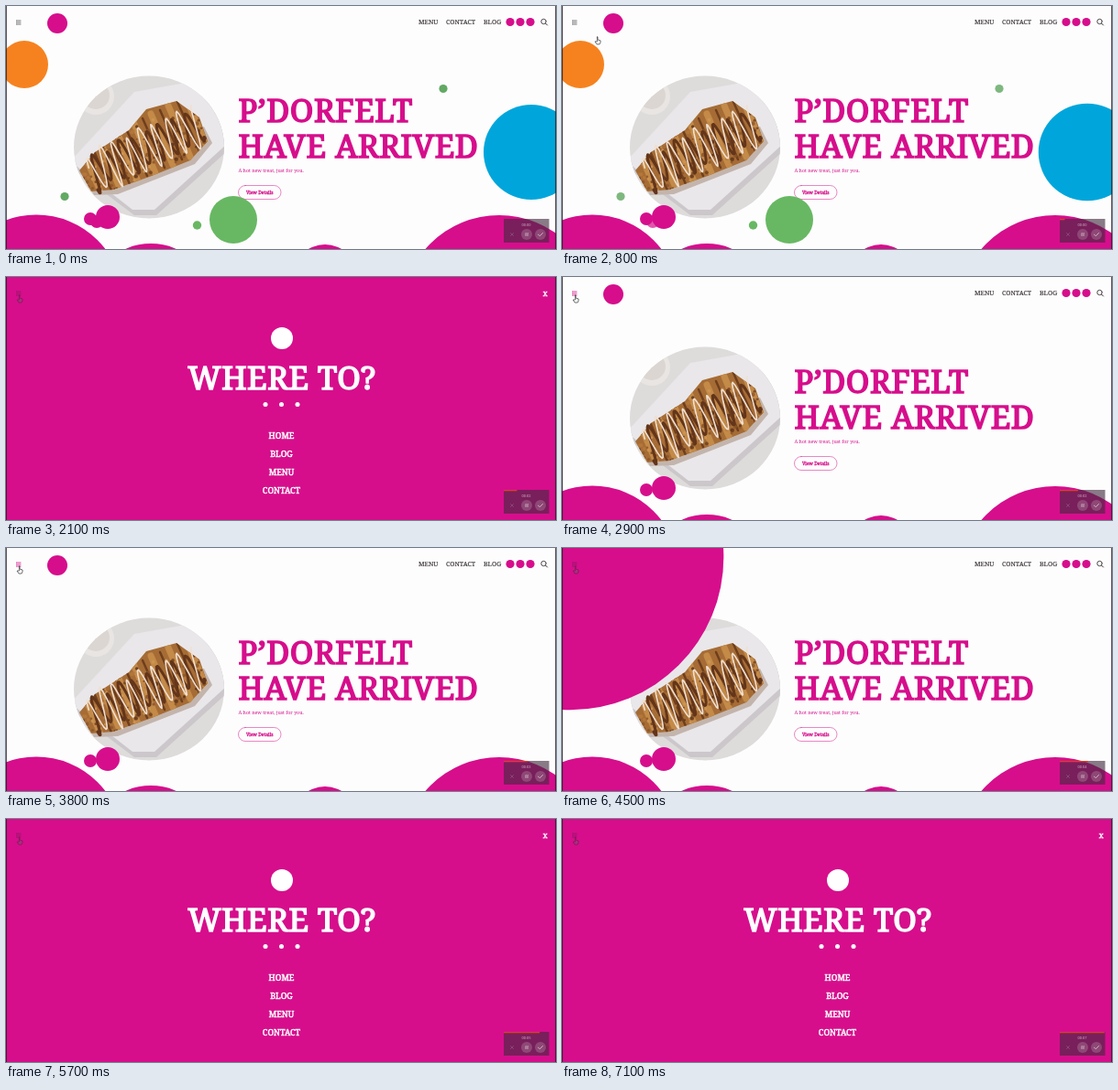
Animation, 600 px wide and 266 px high, one loop 7200 ms. Source, as an HTML page with a canvas:

```html
<!DOCTYPE html>
<html lang="en">
<head>
<meta charset="utf-8">
<style>
html, body { margin: 0; width: 100%; height: 100%; overflow: hidden; background: #fdfdfd; }
canvas { display: block; width: 600px; height: 266px; }
</style>
</head>
<body>
<canvas id="stage"></canvas>
<script>
const LOOP = 7200, STEP = 100;
const PINK = '#d60e8c', GREEN = '#68b863', DARK = '#3a3438', WHITE = '#fff';
const canvas = document.getElementById('stage');
const ctx = canvas.getContext('2d');
const dpr = window.devicePixelRatio || 1;
canvas.width = 600 * dpr;
canvas.height = 266 * dpr;

const clamp = v => Math.max(0, Math.min(1, v));
const smooth = v => { v = clamp(v); return v * v * (3 - 2 * v); };
const random = seed => { const v = Math.sin(seed * 12.9898) * 43758.5453; return v - Math.floor(v); };

function disc(x, y, r, color, alpha = 1) {
  ctx.globalAlpha = alpha;
  ctx.fillStyle = color;
  ctx.beginPath();
  ctx.arc(x, y, r, 0, 7);
  ctx.fill();
  ctx.globalAlpha = 1;
}

function path(points, { fill, stroke, width = 1, close = false }) {
  ctx.beginPath();
  points.forEach(([x, y]) => ctx.lineTo(x, y));
  if (close) ctx.closePath();
  ctx.lineWidth = width;
  ctx.lineCap = ctx.lineJoin = 'round';
  if (fill) { ctx.fillStyle = fill; ctx.fill(); }
  if (stroke) { ctx.strokeStyle = stroke; ctx.stroke(); }
}

function text(str, x, y, size, color, { weight = 0, align = 'left', spacing = 0, family = '"Noto Serif", serif' } = {}) {
  ctx.font = `${size}px ${family}`;
  ctx.textAlign = align;
  ctx.letterSpacing = spacing + 'px';
  ctx.fillStyle = ctx.strokeStyle = color;
  ctx.lineJoin = 'miter';
  ctx.fillText(str, x, y);
  if (weight) {
    ctx.lineWidth = weight;
    ctx.strokeText(str, x, y);
  }
}

const title = (str, x, y, color, align) => text(str, x, y, 34.5, color, { weight: 1.6, spacing: 0.6, align });

function burger(color) {
  for (const y of [16, 18, 20]) path([[11, y], [16, y]], { stroke: color, width: 0.8 });
}

// Wavy line of sauce running along the pastry
function drizzle(color, width, phase, amp) {
  const points = [];
  for (let u = 0; u <= 1; u += 0.008) {
    const swing = Math.sin(u * 52 + phase) * (amp + 4 * Math.sin(u * 19 + phase));
    points.push([93 + 118 * u + swing * 0.4, 184 - 54 * u + swing + 3 * Math.sin(u * 31)]);
  }
  path(points, { stroke: color, width });
}

function photo() {
  const colors = ['#70401f', '#8a5429', '#b77a3b', '#cf9855', '#5a3018'];
  ctx.save();
  ctx.beginPath();
  ctx.ellipse(156, 154.5, 82, 78, 0, 0, 7);
  ctx.clip();
  ctx.fillStyle = '#dedbdb';
  ctx.fillRect(70, 70, 172, 170);
  disc(98, 99, 20, '#e8e5e3');
  disc(98, 98, 15, '#dcd6d2');
  path([[70, 176], [140, 98], [196, 88], [246, 122], [242, 158], [164, 229], [140, 229]], { fill: '#cbc7ca', close: true });
  path([[70, 170], [140, 94], [196, 84], [246, 116], [240, 152], [162, 223], [138, 223]], { fill: '#e9e7e9', close: true });
  path([[86, 190], [96, 207], [122, 206], [206, 173], [225, 150], [216, 132]], { fill: '#c3b5ad', close: true });
  path([[80, 180], [97, 160], [134, 136], [153, 113], [186, 104], [211, 122], [220, 148], [201, 169], [159, 186], [117, 201], [93, 203]],
    { fill: '#a66c35', close: true });
  ctx.save();
  ctx.clip();
  for (let i = 0; i < 7; i++) {
    const x = 92 + i * 19, y = 184 - i * 9;
    path([[x - 10, y - 30], [x + 14, y + 26]], { stroke: '#c38a48', width: 7 });
    path([[x, y - 34], [x + 24, y + 20]], { stroke: '#6f3f1d', width: 2.5 });
  }
  for (let i = 0; i < 170; i++) {
    const x = 82 + 138 * random(i + 1);
    disc(x, 230 - 0.45 * x + 62 * (random(i + 400) - 0.6), 1 + 1.4 * random(i + 800), colors[i % 5], 0.8);
  }
  ctx.restore();
  drizzle('#63351a', 3, 1, 17);
  drizzle('#f0e0d2', 1.6, 3.5, 21);
  ctx.restore();
}

function floaters(t) {
  const u = clamp(t / 1600);
  disc(20, 64, 26, '#f6821f');
  disc(573, 160, 52 + 2.5 * u, '#00a6db');
  disc(248, 234, 26, GREEN);
  disc(208.5, 240, 4.7, GREEN);
  disc(64, 208.5, 4.6, '#62a964', 1 - 0.35 * u);
  disc(477, 90.5, 4.6, '#62a964', 1 - 0.35 * u);
  disc(99, 236, 7, PINK, 1 - 0.6 * u);
}

function home(t, hovered) {
  ctx.fillStyle = '#fdfdfd';
  ctx.fillRect(0, 0, 600, 266);
  disc(33, 323, 94.5, PINK);
  disc(158, 328, 68, PINK);
  disc(348, 296, 35, PINK);
  disc(538, 335, 106, PINK);

  photo();
  title('P’DORFELT', 253.5, 127, PINK);
  title('HAVE ARRIVED', 253.5, 165.5, PINK);
  text('A hot new treat, just for you.', 253.5, 182, 5.25, PINK);
  ctx.strokeStyle = PINK;
  ctx.lineWidth = 0.5;
  ctx.beginPath();
  ctx.roundRect(253.5, 196.5, 46.5, 15, 7.5);
  ctx.stroke();
  text('View Details', 276.7, 206, 5, PINK, { weight: 0.3, align: 'center' });

  if (t < 2100) floaters(t);
  disc(92, 233, 7, PINK);
  disc(111, 231, 13, PINK);

  burger(hovered ? PINK : '#555');
  disc(56, 19, 11, PINK);
  text('MENU', 450, 20, 7, DARK, { weight: 0.15 });
  text('CONTACT', 480, 20, 7, DARK, { weight: 0.15 });
  text('BLOG', 521, 20, 7, DARK, { weight: 0.15 });
  for (const x of [550, 561, 572]) disc(x, 17.5, 4.6, PINK);
  ctx.strokeStyle = DARK;
  ctx.lineWidth = 0.9;
  ctx.beginPath();
  ctx.arc(586.5, 17, 2.7, 0, 7);
  ctx.stroke();
  path([[588.5, 19], [590.5, 21]], { stroke: DARK });
}

function menu(radius) {
  if (radius <= 0) return;
  ctx.save();
  ctx.beginPath();
  ctx.arc(9, 10, radius, 0, 7);
  ctx.clip();
  ctx.fillStyle = PINK;
  ctx.fillRect(0, 0, 600, 266);
  burger('#8d1765');
  disc(301, 67, 12, WHITE);
  title('WHERE TO?', 301, 123, WHITE, 'center');
  for (const x of [283, 300.5, 318]) disc(x, 139.5, 2.5, WHITE);
  ['HOME', 'BLOG', 'MENU', 'CONTACT'].forEach((item, i) =>
    text(item, 300.5, 177 + i * 20, 9, WHITE, { weight: 0.5, align: 'center' }));
  text('X', 588.3, 20.7, 7.5, WHITE, { weight: 0.4, align: 'center' });
  ctx.restore();
}

function pointer(t, onMenu) {
  if (t < 100) return;
  const u = smooth((t - 100) / 900);
  ctx.save();
  ctx.translate(15 + 190 * (1 - u), 20 + 110 * (1 - u));
  path([[-1, 0], [0, 0], [0, 3], [3, 4], [3, 6], [2, 8], [-1, 8], [-3, 5], [-1, 5]],
    { fill: onMenu ? '#a8307c' : WHITE, stroke: onMenu ? '#7b1658' : '#333', width: 0.7, close: true });
  ctx.restore();
}

function recorder(t) {
  const glyph = '#e3c9d8', faint = '#8a5c80';
  ctx.fillStyle = 'rgba(66,42,62,.62)';
  ctx.fillRect(543, 233, 49.5, 26);
  ctx.fillStyle = '#d8402a';
  ctx.fillRect(543, 233, 49.5 * t / LOOP, 1.3);
  text('00:0' + Math.floor(t / 1000), 567.5, 241, 4, '#c9afc0', { align: 'center', family: 'Roboto, sans-serif' });
  disc(568, 250, 6, '#b796aa', 0.35);
  disc(583, 250, 6, '#b796aa', 0.35);
  for (const x of [567, 569]) path([[x, 248.5], [x, 251.5]], { stroke: glyph, width: 0.8 });
  path([[580.5, 250], [582.3, 251.8], [585.5, 248.5]], { stroke: glyph, width: 0.8 });
  path([[550.5, 248.5], [553.5, 251.5]], { stroke: faint, width: 0.7 });
  path([[553.5, 248.5], [550.5, 251.5]], { stroke: faint, width: 0.7 });
}

function draw(now) {
  const t = Math.floor(now % LOOP / STEP) * STEP;
  const ramp = start => smooth((t - start) / 500);
  const radius = 700 * (ramp(1428) - ramp(2380) + ramp(4341));
  ctx.setTransform(dpr, 0, 0, dpr, 0, 0);
  home(t, t >= 1000);
  menu(radius);
  pointer(t, radius > 30);
  recorder(t);
  ctx.fillStyle = 'rgba(30,20,28,.7)';
  for (const x of [0, 599]) ctx.fillRect(x, 0, 1, 266);
}

const begin = performance.now();
function tick() {
  draw(performance.now() - begin);
  requestAnimationFrame(tick);
}
tick();
</script>
</body>
</html>
```
